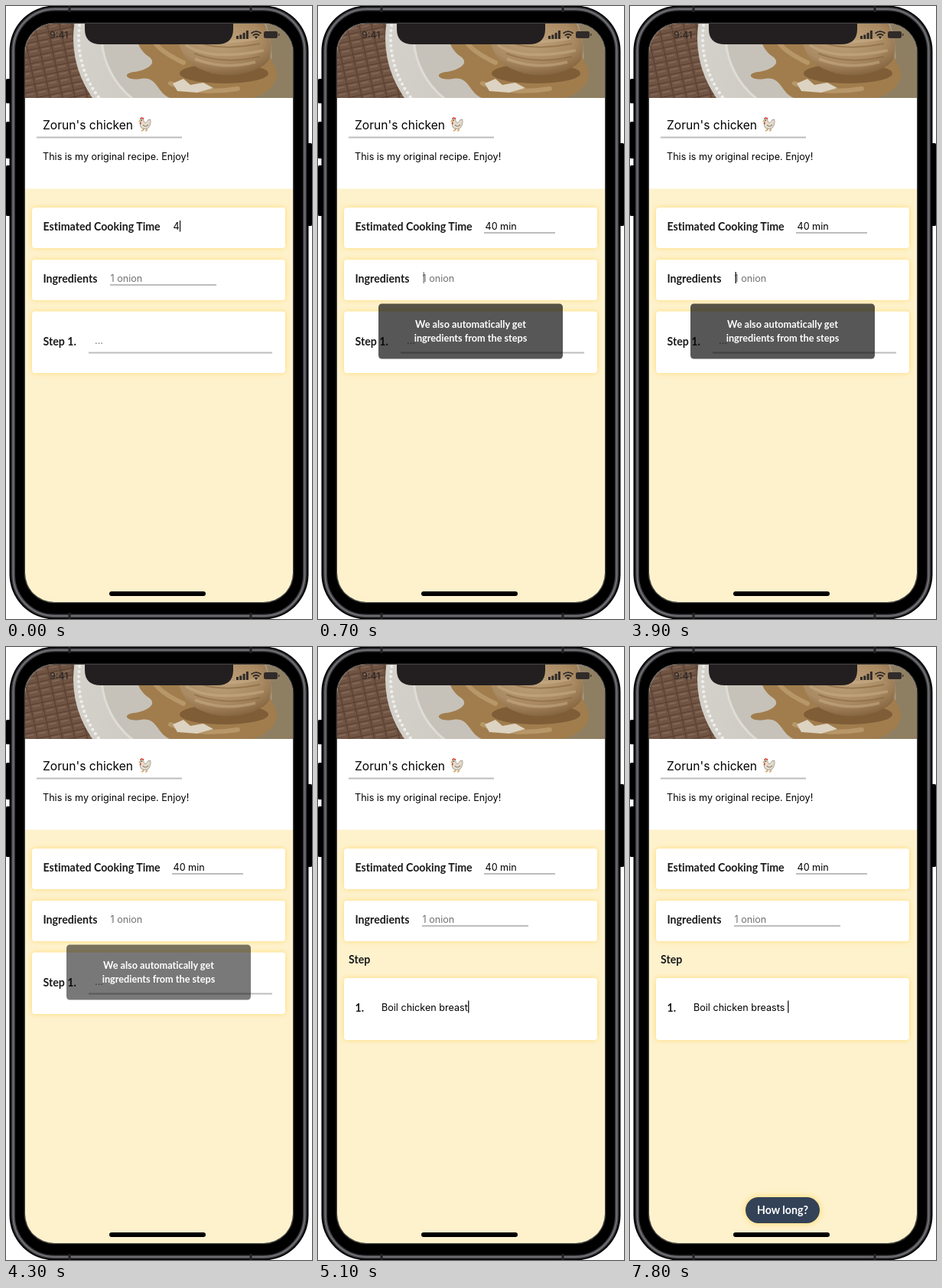
An HTML page for the animation above (8000 ms loop, 400 by 800 pixels).

```html
<!DOCTYPE html>
<html lang="en">
<head>
<meta charset="utf-8">
<title>Recipe editor</title>
<style>
  html, body { margin: 0; width: 100%; height: 100%; overflow: hidden; background: #fff; }
  svg { display: block; width: 100vw; height: 100vh; }
  text { font: 12.6px Inter, sans-serif; fill: #000; }
  .bold { font: bold 14.2px Lato, sans-serif; fill: #1a1a1a; font-variant-ligatures: none; }
  .title { font-size: 15.6px; }
  .hint { fill: #707070; }
  .toast { font-size: 12.7px; fill: #fff; text-anchor: middle; }
  .line { stroke: #bdbdbd; stroke-width: 1.8; }
  .card { fill: #fff; filter: drop-shadow(0 0 3px #ffd65ccc); }
  .cursor { fill: #222; width: 1.4px; }
</style>
</head>
<body>
<svg viewBox="0 0 400 800">
  <defs>
    <clipPath id="screen"><rect x="25" y="23" width="350" height="755" rx="38"/></clipPath>
    <clipPath id="photo"><rect x="25" y="23" width="350" height="97"/></clipPath>
    <pattern id="weave" width="16" height="9" patternUnits="userSpaceOnUse" patternTransform="rotate(-12)">
      <rect width="16" height="9" fill="#705443"/>
      <path d="M0 8.5H16M15.5 0V9" stroke="#573d2e" stroke-width="1.2"/>
      <path d="M2 2.5H12" stroke="#866b59" stroke-width="1.6"/>
    </pattern>
    <linearGradient id="plate" x2="1" y2=".3">
      <stop stop-color="#d6d4cf"/><stop offset=".5" stop-color="#cfcbc3"/><stop offset="1" stop-color="#a89c86"/>
    </linearGradient>
    <radialGradient id="scoop" cx=".45" cy=".3" r=".75">
      <stop stop-color="#bfa27c"/><stop offset=".6" stop-color="#a98a62"/><stop offset="1" stop-color="#80603c"/>
    </radialGradient>
  </defs>

  <!-- phone body -->
  <g id="buttons"></g>
  <rect x="4.500" y="-.5" width="391" height="801" rx="59"/>
  <g fill="none">
    <rect x="9.500" y="4" width="381" height="792" rx="54" stroke="#3c3c40" stroke-width="5"/>
    <rect x="9.500" y="4" width="381" height="792" rx="54" stroke="#707074" stroke-width="2"/>
    <rect x="24.300" y="22.300" width="351.400" height="756.400" rx="39" stroke="#444" stroke-width="1.2"/>
    <path d="M83 0V8M320 0V8M83 792V800M320 792V800" stroke="#222" stroke-width="3"/>
  </g>

  <g clip-path="url(#screen)">
    <rect x="25" y="23" width="350" height="755" fill="#fef2cd"/>
    <rect x="25" y="23" width="350" height="215.500" fill="#fff"/>

    <g clip-path="url(#photo)">
      <rect x="25" y="23" width="350" height="97" fill="url(#weave)"/>
      <circle cx="222" cy="42" r="134" fill="url(#plate)"/>
      <g id="beads" fill="#efeeea"></g>
      <circle cx="230" cy="38" r="105" fill="#c6c2b9" stroke="#dfdcd6" stroke-width="3"/>
      <path d="M340 23H375V120H318Q362 92 340 23Z" fill="#8f7f62"/>
      <path d="M172 23C168 45 174 58 188 67C198 76 182 84 168 86C150 88 158 98 176 95C198 91 196 112 214 120H322C350 112 362 91 348 73L330 23Z" fill="#a17d4d"/>
      <path d="M184 23C188 49 205 61 232 74M215 101Q252 116 303 108" fill="none" stroke="#b79668" stroke-width="6" stroke-linecap="round"/>
      <path d="M218 101L232 95L241 103L258 100L271 107L250 113L224 111Z" fill="#ddd3c2"/>
      <ellipse cx="285" cy="88" rx="58" ry="13" fill="#7f5d37"/>
      <path d="M224 23C220 48 233 76 258 84C285 96 325 90 342 73C352 56 343 37 338 23Z" fill="url(#scoop)"/>
      <path d="M237 34Q268 54 330 42M235 51Q267 72 337 58M247 69Q285 84 326 73" fill="none" stroke="#cbb18c" stroke-width="3.500" opacity=".5"/>
      <path d="M240 42Q272 61 332 49M246 62Q285 77 332 66" fill="none" stroke="#85663f" stroke-width="2" opacity=".6"/>
    </g>

    <!-- status bar -->
    <text x="57" y="42" style="font-size:12.3px;font-weight:500;fill:#2d2927">9:41</text>
    <g fill="#302b28">
      <path d="M301 39h3v4h-3zM305.300 37.500h3v5.500h-3zM309.600 35h3v8h-3zM313.900 32h3v11h-3z"/>
      <path d="M324.700 40.500L327 43L329.300 40.500Q327 38.700 324.700 40.500Z"/>
      <path d="M322.800 38.500Q327 35 331.200 38.500M320.500 35.800Q327 30.500 333.500 35.800" fill="none" stroke="#302b28" stroke-width="1.800"/>
      <rect x="337" y="33" width="18" height="9" rx="2.300"/><rect x="356" y="36" width="1.400" height="3" rx=".7"/>
    </g>

    <!-- header -->
    <text class="title" x="48" y="161">Zorun's chicken</text>
    <g id="chicken">
      <path d="M180 159l-1 3.500l-2 .5M184 159v3.500l-2 .5" fill="none" stroke="#c98a35" stroke-width="1.100"/>
      <path d="M175.500 149C175 145.500 180 145.500 180 149.500C181 153.500 183 153 184.500 150.500Q186 146.500 189 148.500Q187.500 149.500 189.500 151Q188 152 188.500 154Q187.500 160 182 160.500C176 160.500 174.500 156.500 176 152.500Z" fill="#e3dbcc" stroke="#8a8072" stroke-width=".7"/>
      <path d="M179 155Q182 159 186 155" fill="none" stroke="#8d8170" stroke-width="1.100"/>
      <path d="M175.500 147.500Q174.500 145 176.500 146Q177 144 178.500 146Q181 145 180 148Q178 146.500 175.500 147.500ZM175 151.500q-1 3 1 3q1.300-1.500 0-3Z" fill="#d43c2d"/>
      <path d="M175.500 149l-2.700 1.300l2.700.9Z" fill="#e0a033"/>
      <circle cx="177.300" cy="149" r=".7"/>
    </g>
    <path class="line" d="M40 171.500H230"/>
    <text x="48" y="200.500">This is my original recipe. Enjoy!</text>

    <!-- cooking time -->
    <rect class="card" x="34" y="263" width="331" height="53" rx="4"/>
    <text class="bold" x="48.500" y="292.500">Estimated Cooking Time</text>
    <text id="time" x="218.500" y="291.500"></text>
    <path id="timeLine" class="line" d="M217 296H310"/>
    <rect id="timeCursor" class="cursor" y="280" height="14.500"/>

    <!-- ingredients -->
    <rect class="card" x="34" y="331" width="331" height="53" rx="4"/>
    <text class="bold" x="48.500" y="360.500">Ingredients</text>
    <text class="hint" x="136.500" y="359.500">1 onion</text>
    <path id="itemLine" class="line" d="M136 364H275"/>
    <rect id="itemCursor" class="cursor" x="137.500" y="347" height="15"/>

    <!-- step, before typing -->
    <g id="emptyStep">
      <rect class="card" x="34" y="398.500" width="331" height="80.500" rx="4"/>
      <text class="bold" x="48.500" y="442.500">Step 1.</text>
      <text class="hint" x="116" y="441">...</text>
      <path id="stepLine" class="line" d="M108 452.500H348"/>
      <rect id="emptyCursor" class="cursor" x="116" y="429" height="16"/>
    </g>

    <!-- step, while typing -->
    <g id="filledStep">
      <text class="bold" x="40" y="412.500">Step</text>
      <rect class="card" x="34" y="432" width="331" height="81" rx="4"/>
      <text class="bold" x="48.500" y="475.500">1.</text>
      <text id="step" x="83" y="474.500"></text>
      <rect id="stepCursor" class="cursor" y="461.500" height="16"/>
    </g>

    <g id="toast">
      <rect x="79" y="388.500" width="241" height="72" rx="4.500" fill="#000" fill-opacity=".66"/>
      <text class="bold toast" x="199.500" y="420">We also automatically get</text>
      <text class="bold toast" x="199.500" y="438">ingredients from the steps</text>
    </g>

    <g id="action">
      <rect x="151" y="718" width="97" height="34" rx="17" fill="#334257" style="filter:drop-shadow(0 0 4px #ffd65c)"/>
      <text class="bold" x="199.500" y="739.500" style="fill:#fff;text-anchor:middle">How long?</text>
    </g>

    <path d="M103 22H297V30Q297 50 276 50H124Q103 50 103 30Z" fill="#231f20"/>
    <rect x="135" y="764" width="126" height="6" rx="3"/>
  </g>
</svg>
<script>
const LOOP = 8000;
const $ = id => document.getElementById(id);
const clamp = v => Math.max(0, Math.min(1, v));
const easeOut = p => 1 - (1 - p) ** 2;
const fade = (id, opacity) => $(id).setAttribute('opacity', opacity);

$('buttons').innerHTML = [[0, 95, 32], [0, 151, 48], [0, 208, 66], [392, 179, 108]]
  .map(([x, y, h]) => `<rect x="${x}" y="${y}" width="8" height="${h}" rx="1.5"/>`).join('');

$('beads').innerHTML = Array.from({ length: 70 }, (_, i) => {
  const a = Math.PI * (0.2 + i * 0.0165);
  return `<circle cx="${222 + 127 * Math.cos(a)}" cy="${42 + 127 * Math.sin(a)}" r="2.1"/>`;
}).join('');

// Cursor fades in, holds, fades out and rests, a quarter second each.
function blink(t, start) {
  const p = ((t - start) % 1000 + 1000) % 1000;
  return p < 500 ? easeOut(clamp(p / 250)) : 1 - easeOut(clamp((p - 500) / 250));
}

function hold(t) {
  if (t >= 700 && t < 4300) return 700 + Math.floor((t - 700) / 200) * 200;
  const step = t >= 5200 ? 200 : 100;
  return Math.floor(t / step) * step;
}

function type(name, text, count) {
  const field = $(name);
  field.textContent = text.slice(0, count).replace(/ /g, '\u00a0');
  const end = +field.getAttribute('x') + field.getComputedTextLength();
  $(name + 'Cursor').setAttribute('x', end + 0.2);
}

function draw(t) {
  const focus = t < 600 ? 'time' : t < 4500 ? 'item' : 'step';
  const typing = t >= 4600;

  type('time', '40 min', 1 + t / 100);
  fade('timeLine', +(focus !== 'time'));
  fade('timeCursor', +(focus === 'time'));

  fade('itemLine', +(focus !== 'item'));
  fade('itemCursor', focus === 'item' ? blink(t, 620) : 0);

  fade('emptyStep', +!typing);
  fade('stepLine', +(focus !== 'step'));
  fade('emptyCursor', +(focus === 'step'));

  fade('filledStep', +typing);
  const letters = Math.min(20, 4 + Math.max(0, t - 4600) / 100 * 3);
  type('step', 'Boil chicken breasts ', t < 7600 ? letters : 21);
  fade('stepCursor', t < 5600 || t >= 7600 ? 1 : blink(t, 5100));

  fade('toast', clamp((t - 550) / 150) * clamp((4500 - t) / 250));
  fade('action', +(t >= 5200));
}

const origin = performance.now();
function tick() {
  draw(hold((performance.now() - origin) % LOOP));
  requestAnimationFrame(tick);
}
tick();
</script>
</body>
</html>
```
